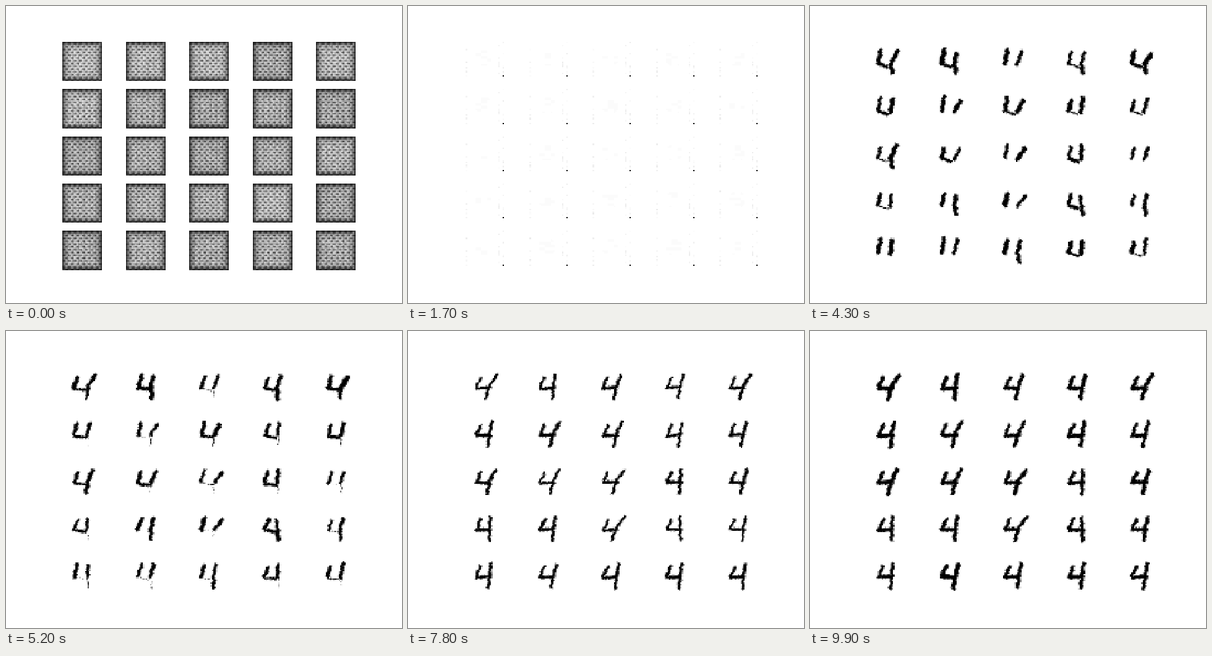
An HTML page with a canvas for the animation above (10000 ms loop, 640 by 480 pixels).

```html
<!DOCTYPE html>
<html lang="en">
<head>
<meta charset="utf-8">
<title>Generated digits</title>
<style>
html, body { margin: 0; width: 100%; height: 100%; overflow: hidden; background: #fff; }
canvas { display: block; width: 640px; height: 480px; }
</style>
</head>
<body>
<canvas id="stage" width="640" height="480"></canvas>
<script>
const N = 28, SIZE = 64, CELL = SIZE / N, STEP = 100, STEPS = 100;
const BLANK = 14, BLOB = 29, PARTS = 43, EARLY = 62, THIN = 78, LAST = 99;

const ctx = document.getElementById('stage').getContext('2d');
const cells = document.createElement('canvas');
cells.width = cells.height = N;
const cellCtx = cells.getContext('2d');
const image = cellCtx.createImageData(N, N);

const clamp = v => Math.max(0, Math.min(1, v));
const mix = (a, b, p) => a + (b - a) * p;
const ease = p => { p = clamp(p); return p * p * (3 - 2 * p); };
const hash = (a, b, c = 0) => {
  const s = Math.sin(a * 12.9898 + b * 78.233 + c * 37.719) * 43758.5453;
  return s - Math.floor(s);
};
const vary = (size, a, b, c) => size * (2 * hash(a, b, c) - 1);

// Where the right stem of each digit starts; it sets the slant
const STEM = [
  53, 44, 48, 46, 52,
  45, 51, 50, 44, 46,
  50, 50, 53, 42, 47,
  42, 44, 54, 40, 45,
  43, 46, 45, 43, 44
];

// Each pose has four strokes [x1, y1, x2, y2, width]: arm, bar, stem, foot.
// A negative width hides a stroke.
function parts(tile) {
  const top = STEM[tile] - 2, rnd = k => hash(tile, k, 4);
  return [
    [23, 12 + 8 * rnd(1), 19, 35, 5 + 3 * rnd(2)],
    [20, 36, 34, 41, rnd(3) > .4 ? 2 + 4 * rnd(4) : -4],
    [top, 14 + 7 * rnd(5), 39, 37, 5 + 3 * rnd(6)],
    [40, 38, 42, 50, rnd(7) > .55 ? 7 : -4]
  ];
}

function four(tile, seed, width) {
  const top = STEM[tile], foot = 41 - (top - 40) * .5;
  const shift = k => vary(1.2, tile, seed, k);
  const w = width + vary(.7, tile, seed, 9);
  return [
    [27 + shift(1), 18 + shift(2), 20 + shift(3), 33, w - .6],
    [20, 35 + shift(4), 42, 34 + shift(5), w],
    [top, 14 + shift(6), 41, 31, w - .3],
    [41, 31, foot + shift(7), 52 + shift(8), w - .3]
  ];
}

const POSES = [
  [PARTS, parts],
  [EARLY, tile => four(tile, 1, 5.8)],
  [THIN, tile => four(tile, 2, 5)],
  [LAST, tile => four(tile, 3, 6.6)]
];

// Strokes of a tile at a step, restless between the poses
function strokesAt(tile, n) {
  let i = 1;
  while (i < POSES.length - 1 && n > POSES[i][0]) i++;
  const [t0, from] = POSES[i - 1], [t1, to] = POSES[i];
  const p = clamp((n - t0) / (t1 - t0)), loose = 1.3 * Math.sin(Math.PI * p);
  const a = from(tile), b = to(tile);
  return a.map((s, k) => s.map((v, j) =>
    mix(v, b[k][j], ease(p)) + vary(loose, tile + k * 30, n, j)));
}

// Signed distance to the nearest stroke, negative inside
function inkDistance(strokes, x, y) {
  let best = 99;
  for (const [x1, y1, x2, y2, w] of strokes) {
    const dx = x2 - x1, dy = y2 - y1;
    const k = clamp(((x - x1) * dx + (y - y1) * dy) / (dx * dx + dy * dy || 1));
    best = Math.min(best, Math.hypot(x - x1 - k * dx, y - y1 - k * dy) - w / 2);
  }
  return best;
}

// Striped round blob with a lattice of light dots
function blob(tile, x, y, r, c, grow) {
  const cx = 31 + vary(2, tile, 1), cy = 32.5 + vary(1.5, tile, 2);
  const rx = 28 + vary(3, tile, 3), ry = 27 + vary(3, tile, 4);
  const near = Math.hypot((x - cx) / rx, (y - cy) / ry);
  const d = (near - grow) * Math.min(rx, ry) + [-2, 5, 9, 0][r % 4];
  return r % 4 === 2 && c % 4 === 0 ? d + 24 : d;
}

// Woven grey start that bleaches out, edges last
function weave(tile, r, c, n) {
  const edge = Math.min(r, c, N - 1 - r, N - 1 - c);
  let v = .8 - .08 * hash(tile, 5) + vary(.09, r * 31 + c, tile, 2);
  if (r % 2 && (c + (r % 4 === 1 ? 0 : 2)) % 4 < 2) v -= .32;
  if (c % 4 === 3) v -= .08;
  v *= 1 - .72 * Math.exp(-edge / 1.6);
  if ((r === N - 2 || r === 0) && c % 4 < 2) v *= .5;
  const p = n / BLANK;
  return mix(v, 1, ease(p * (1.7 - (edge < 3 ? .3 : 0)) - .2 * hash(r, c, n) * (p < 1)));
}

// One black cell and faint specks left on the blank tiles
function residue(tile, r, c) {
  if (r === 24 && c === 27) return 0;
  if ((c === 24 || c === 27 || c === 1) && hash(r, c) > .8) return .92 + .07 * hash(tile, r, c);
  return Math.hypot(r - 11, c - 13) < 6 && hash(r >> 1, c >> 2, tile) > .75 ? .985 : 1;
}

function shade(tile, r, c, n, strokes) {
  const x = (c + .5) * CELL, y = (r + .5) * CELL;
  if (n <= 16) {
    const v = weave(tile, r, c, Math.min(n, BLANK));
    return n > 8 ? Math.min(v, residue(tile, r, c)) : v;
  }
  if (n <= BLOB) {
    const grow = ease((n - 17) / (BLOB - 17)) * 1.35 - .35;
    const v = clamp(.5 + blob(tile, x, y, r, c, grow) / 5);
    return n < 20 ? Math.min(v, residue(tile, r, c)) : v;
  }
  const p = clamp((n - BLOB) / (PARTS - BLOB));
  const rough = vary(.9, r * 31 + c, tile, n);
  const ink = inkDistance(strokes, x + Math.sin(y * .5 + tile) * .7, y) + rough;
  const d = p < 1 ? mix(blob(tile, x, y, r, c, 1), ink, p) : ink;
  return clamp(.5 + d / mix(5, 2, p));
}

function draw(n) {
  ctx.fillStyle = '#fff';
  ctx.fillRect(0, 0, 640, 480);
  ctx.imageSmoothingEnabled = false;
  for (let tile = 0; tile < 25; tile++) {
    const strokes = strokesAt(tile, n);
    for (let k = 0; k < N * N; k++) {
      const g = 255 * clamp(shade(tile, Math.floor(k / N), k % N, n, strokes));
      image.data.set([g, g, g, 255], k * 4);
    }
    cellCtx.putImageData(image, 0, 0);
    const x = Math.round(91.2 + (tile % 5) * 102.5);
    const top = 57.9 + Math.floor(tile / 5) * 76.36;
    const y = Math.round(top);
    ctx.drawImage(cells, x, y, SIZE, Math.round(top + 63.4) - y);
  }
}

let shown = -1;
const begin = performance.now();
function tick() {
  const n = Math.floor((performance.now() - begin) / STEP) % STEPS;
  if (n !== shown) draw(shown = n);
  requestAnimationFrame(tick);
}
tick();
</script>
</body>
</html>
```
